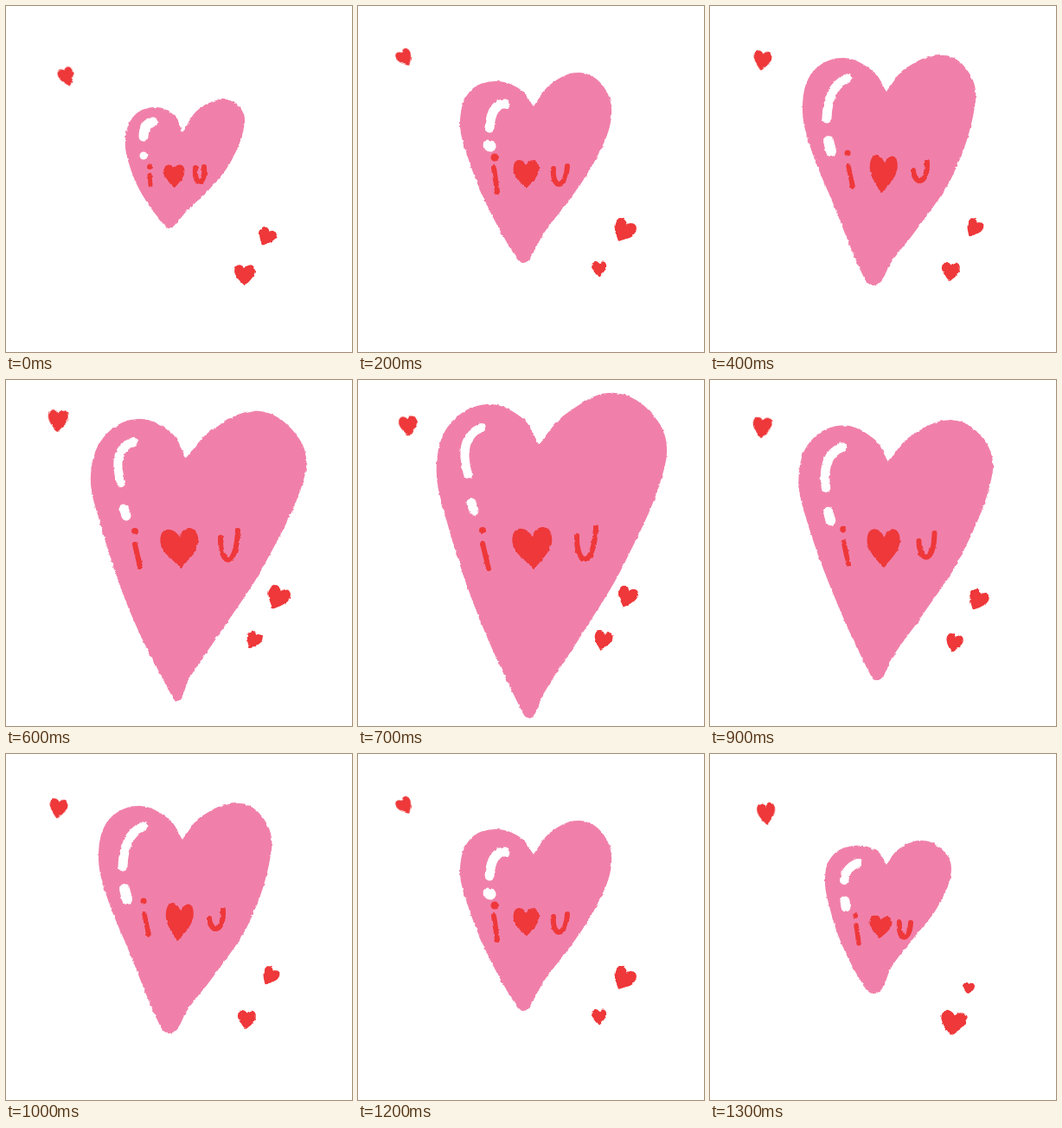
Animation of 400 by 400 pixels, one loop 1.4 s. Source, as an HTML page:

```html
<!DOCTYPE html>
<html lang="en">
<head>
<meta charset="utf-8">
<title>i love u</title>
<style>
  html, body { margin: 0; width: 100%; height: 100%; overflow: hidden; background: #fff; }
  #strip {
    display: flex;
    width: 800vw;
    height: 100vh;
    animation: beat 1.4s steps(7, end) infinite;
  }
  #strip svg { flex: none; display: block; width: 100vw; height: 100vh; }
  /* the poses run 0 to 7 and back, 100 ms each */
  @keyframes beat { 50% { transform: translateX(-87.5%); } }
  .body { fill: #f080aa; }
  .gloss, .ink { fill: none; stroke-linecap: round; stroke-linejoin: round; }
  .gloss { stroke: #fff; }
  .ink { stroke: #ee383a; }
  .love { fill: #ee383a; stroke: #ee383a; stroke-width: 2; stroke-linejoin: round; vector-effect: non-scaling-stroke; }
</style>
</head>
<body>
<svg width="0" height="0" style="position:absolute" aria-hidden="true">
  <filter id="rough" x="0" y="0" width="400" height="400" filterUnits="userSpaceOnUse" color-interpolation-filters="sRGB">
    <feTurbulence type="fractalNoise" baseFrequency=".2" numOctaves="2" seed="4"/>
    <feDisplacementMap in="SourceGraphic" scale="3" xChannelSelector="R" yChannelSelector="G"/>
  </filter>
</svg>
<div id="strip" role="img" aria-label="i love u"></div>
<script>
// edge: outline from the notch, counterclockwise; strokes: [path, width]; loves: x y w h turn
const pose = (edge, gloss, spot, dot, stem, u, loves) => ({ edge, gloss, spot, dot, stem, u, loves });

const tiny = pose(
  '204,146 194,126 172,117 148,127 138,154 143,185 158,219 182,252 189,257 197,251 209,237 235,212 261,178 276,134 268,115 249,108 222,120',
  ['M170,134 Q159,136 159,151', '11'], ['M159,173 L159,173.1', '9'],
  ['M166,186 L166,186.1', '6'], ['M166,195 L167,207', '5'],
  ['M219,187 C217,210 231,208 229,186', '6'],
  ['194.5 196.5 24 27 0', '70 82 18 22 -20', '301 267 20 21 28', '276 311 24 24 0']);

const small = pose(
  '204,128 193,112 168,106 143,116 133,142 139,180 155,226 180,271 189,277 199,271 210,246 236,212 263,177 279,134 267,109 243,100 218,110',
  ['M171,126 Q157,131 155,146', '10'], ['M156,170 L157,177', '11'],
  ['M168,187 L168,187.1', '6'], ['M169,198 L172,219', '5.5'],
  ['M219,194 C217,218 231,217 232,195', '6'],
  ['197 200 26 26 5', '65 69 21 25 -4', '299 271 14 13 0', '281 311 30 28 12']);

const medium = pose(
  '203,116 187,96 159,87 130,98 118,132 126,172 150,232 183,291 191,297 199,291 216,261 246,222 276,175 293,127 283,92 255,77 222,91',
  ['M170,113 Q154,113 152,141', '11'], ['M151,161 L153,162', '13'],
  ['M158,175 L158,175.1', '9'], ['M157,187 L161,215', '6'],
  ['M226,188 C224,211 240,214 242,185', '6'],
  ['194.5 194 30 33 0', '54 60 18 20 -30', '307 260 26 26 26', '278.5 304 17 18 3']);

const large = pose(
  '204,99 188,75 153,60 119,76 107,115 115,160 143,230 178,314 188,323 199,316 209,297 242,254 282,193 307,110 298,75 270,57 226,72',
  ['M158,84 Q136,94 135,130', '11'], ['M137,156 L140,168', '12'],
  ['M159,170 L159,170.1', '7'], ['M160,185 L165,209', '5.5'],
  ['M235,190 C236,207 252,208 251,180', '6'],
  ['200 194 32 44 5', '60.5 63 21 23 8', '305 257 19 21 30', '278 307 21 22 5']);

const huge = pose(
  '208,90 191,61 152,45 113,66 98,110 107,159 143,267 191,364 197,371 203,367 212,345 249,290 299,213 345,112 339,68 293,36 239,57',
  ['M148,71 Q121,80 133,119', '10'], ['M136,149 L139,157', '11'],
  ['M149,175 L149,175.1', '8'], ['M149,190 L155,216', '6'],
  ['M248,182 C247,214 266,221 268,174', '6'],
  ['201 194 44 46 -4', '60 47 23 26 3', '314 252 26 27 24', '286 301 18 20 26']);

const full = pose(
  '209,74 190,44 149,28 107,50 91,96 99,150 138,270 190,384 197,391 204,387 215,362 255,300 308,212 355,98 347,48 297,15 242,38',
  ['M143,55 Q115,66 127,109', '10'], ['M131,142 L134,151', '11'],
  ['M144,174 L144,174.1', '8'], ['M144,189 L151,218', '6'],
  ['M253,180 C252,214 272,221 275,171', '6'],
  ['202 194 46 48 -4', '58 53 21 23 -6', '311 251 23 24 20', '283 301 21 22 15']);

const NUM = /-?\d+(\.\d+)?/g;

// halfway between two poses, number by number
function between(a, b) {
  if (typeof a === 'string') {
    const other = b.match(NUM);
    let i = 0;
    return a.replace(NUM, n => (+n + +other[i++]) / 2);
  }
  if (Array.isArray(a)) return a.map((v, i) => between(v, b[i]));
  return Object.fromEntries(Object.keys(a).map(k => [k, between(a[k], b[k])]));
}

// smooth closed curve with one corner at the first point
function outline(edge) {
  const p = edge.split(' ').map(s => s.split(',').map(Number));
  p.push(p[0]);
  const last = p.length - 1;
  const dir = p.map((_, i) => {
    const a = p[Math.max(i - 1, 0)], b = p[Math.min(i + 1, last)];
    const len = Math.hypot(b[0] - a[0], b[1] - a[1]);
    return [(b[0] - a[0]) / len, (b[1] - a[1]) / len];
  });
  let d = 'M' + p[0];
  for (let i = 0; i < last; i++) {
    const a = p[i], b = p[i + 1];
    const k = 0.36 * Math.hypot(b[0] - a[0], b[1] - a[1]);
    const c1 = a.map((v, j) => v + dir[i][j] * k);
    const c2 = b.map((v, j) => v - dir[i + 1][j] * k);
    d += ` C${c1} ${c2} ${b}`;
  }
  return d + 'Z';
}

const line = (cls, [d, width]) => `<path class="${cls}" d="${d}" stroke-width="${width}"/>`;

function love(spec) {
  const [x, y, w, h, turn] = spec.split(' ').map(Number);
  return `<path class="love" transform="translate(${x} ${y}) rotate(${turn}) scale(${(w - 2) / 100} ${(h - 2) / 100})"
    d="M0,-24 C-8,-52 -50,-62 -50,-20 C-50,8 -16,34 0,50 C16,34 50,8 50,-20 C50,-62 8,-52 0,-24Z"/>`;
}

const draw = s => `<svg viewBox="0 0 400 400"><g filter="url(#rough)">
  <path class="body" d="${outline(s.edge)}"/>
  ${line('gloss', s.gloss)}${line('gloss', s.spot)}
  ${line('ink', s.dot)}${line('ink', s.stem)}${line('ink', s.u)}
  ${s.loves.map(love).join('')}
</g></svg>`;

const poses = [tiny, small, medium, between(medium, large), large, between(large, huge), huge, full];
document.getElementById('strip').innerHTML = poses.map(draw).join('');
</script>
</body>
</html>
```
